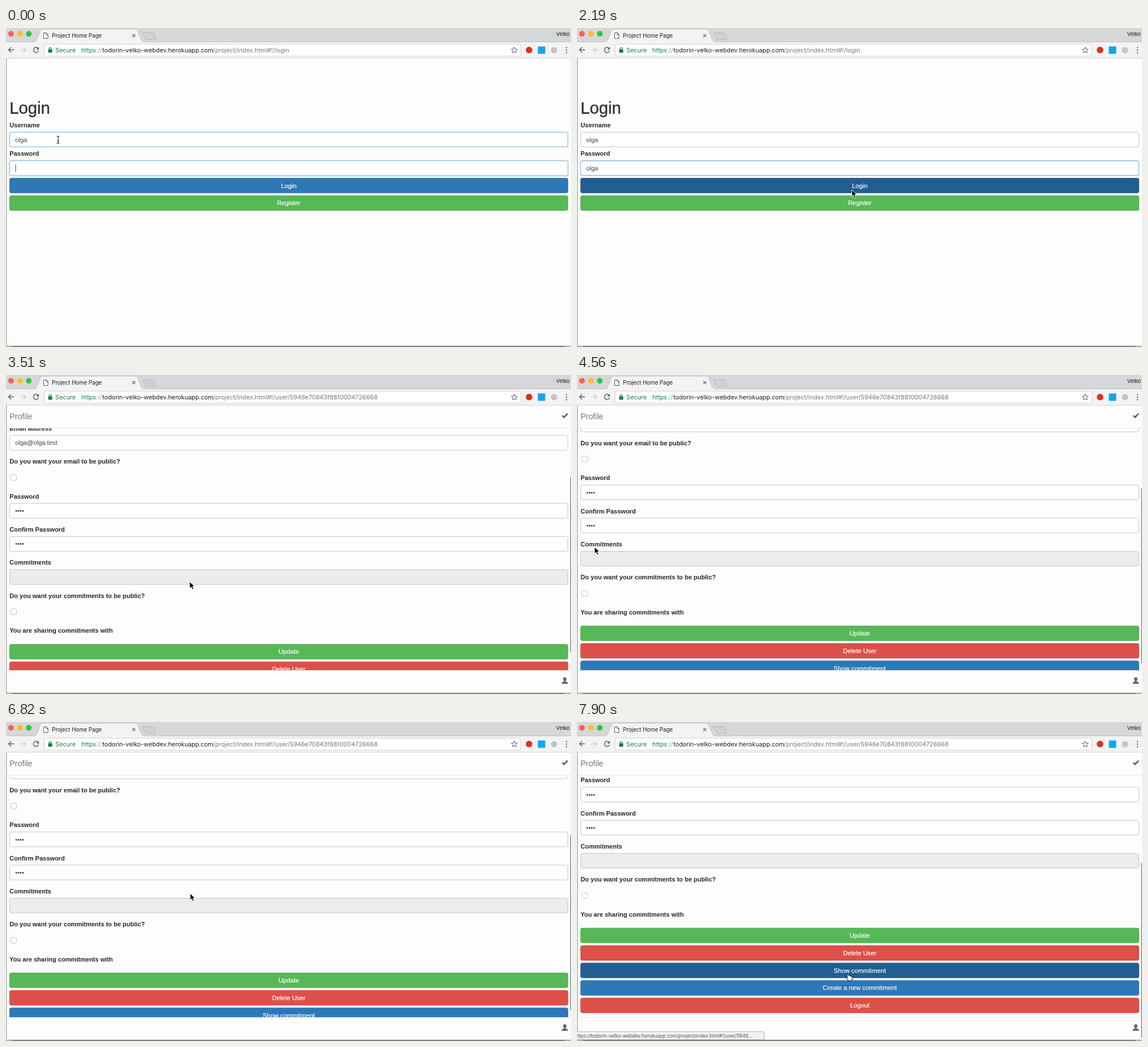
An HTML page that plays this animation: 997x562 px, repeating every 8 s.

```html
<!DOCTYPE html>
<html lang="en">
<head>
<meta charset="utf-8">
<title>Login and profile</title>
<style>
html, body { margin: 0; width: 100%; height: 100%; overflow: hidden; background: #fdfdfd; }
svg { display: block; width: 997px; height: 562px; }
text { white-space: pre; }
.ui { font-family: Inter, sans-serif; font-size: 10.8px; }
.page { font-family: "Liberation Sans", Arial, sans-serif; font-size: 11.1px; fill: #444; }
.label { font-weight: bold; font-size: 11.03px; fill: #262626; }
.button { font-size: 11.2px; fill: #fff; stroke: #fff; stroke-width: .2; text-anchor: middle; }
</style>
</head>
<body>
<svg viewBox="0 0 997 562">
  <defs><clipPath id="view"><rect y="53" width="997" height="507"/></clipPath></defs>
  <g id="page" class="page" clip-path="url(#view)"></g>

  <g class="ui">
    <rect width="997" height="24.5" fill="#d6d7d9"/>
    <rect y="24" width="997" height="29" fill="#f3f3f4"/>
    <path d="M0 24.5H50Q53 24 54.500 20L60.500 5Q62 2 65 2H228Q231 2 232.500 5L238.500 20Q240 24 243 24.500H997" fill="#f3f3f4" stroke="#b4b5b7" stroke-width=".8"/>
    <path d="M0 53.200H997" stroke="#d2d2d3"/>
    <path d="M242 8.500H258Q260 8.500 261 11L264.500 18.500Q265 20.500 263 20.500H249Q246.500 20.500 245.500 18L241 10Q240 8.500 242 8.500Z" fill="#d0d1d3" stroke="#aeafb1" stroke-width=".8"/>
    <circle cx="8.800" cy="10.300" r="5" fill="#fb5f57"/>
    <circle cx="24.500" cy="10.300" r="5" fill="#fdbc2e"/>
    <circle cx="40.200" cy="10.300" r="5" fill="#28c83f"/>
    <path d="M66.500 8.500H71L74 11.500V18.500H66.500ZM71 8.500V11.500H74" fill="#fff" stroke="#555"/>
    <text x="81" y="17" font-size="9.7" fill="#1c1c1c">Project Home Page</text>
    <path d="M222.800 10.700l5.400 5.400m0-5.400l-5.400 5.400" stroke="#555" stroke-width="1.100"/>
    <text x="995" y="13.700" font-size="9.4" text-anchor="end" fill="#1c1c1c">Velko</text>

    <g fill="none" stroke="#5a5a5a" stroke-width="1.400">
      <path d="M14 38.500H4.500M9 34L4.500 38.500L9 43"/>
      <path d="M25.500 38.500H35M30.500 34L35 38.500L30.500 43" stroke="#cfcfcf"/>
      <path d="M56.500 35.500A4.600 4.600 0 1 0 57.400 40"/>
    </g>
    <path d="M58 33.500V38H53.500Z" fill="#5a5a5a"/>
    <rect x="67.500" y="28.500" width="841" height="21" rx="2.500" fill="#fff" stroke="#d4d4d5"/>
    <rect x="74.500" y="37.500" width="7" height="6" rx=".6" fill="#0b8043"/>
    <path d="M76 38V36.500a2 2 0 0 1 4 0V38" fill="none" stroke="#0b8043" stroke-width="1.200"/>
    <text x="87" y="43" fill="#0b8043">Secure</text>
    <text x="133" y="43" fill="#0b8043">https<tspan fill="#6aa886">://</tspan></text>
    <text x="170" y="43" fill="#1c1c1c">todorin-velko-webdev.herokuapp.com</text>
    <text id="path" x="365" y="43" fill="#777"></text>
    <path d="M897 33.700l1.500 3.500 3.800.3-2.900 2.500.9 3.700-3.300-2-3.300 2 .9-3.700-2.900-2.500 3.800-.3z" fill="none" stroke="#5a5a5a"/>
    <circle cx="923" cy="38.800" r="5.800" fill="#e02f23"/>
    <rect x="938.500" y="32.500" width="13" height="13" fill="#12a5ee"/>
    <circle cx="967" cy="39" r="5.500" fill="#c4c4c4"/>
    <path d="M989 33.500v2m0 2.500v2m0 2.500v2" stroke="#555" stroke-width="2"/>
  </g>

  <path d="M.5 53V560" stroke="#8c8c8c"/>
  <path d="M0 560.800H997" stroke="#a5a5a5" stroke-width="2"/>
  <path d="M11 561H986" stroke="#707070" stroke-width="1.500"/>
  <g id="overlay" class="ui"></g>
</svg>
<script>
const $ = id => document.getElementById(id);
const LOOP = 8000, MAX_SCROLL = 316;
const GREEN = ['#57b857', '#46a546'], RED = ['#dc5049', '#cf4038'],
      BLUE = ['#2e78b8', '#286ca8'], DARK = ['#225e92', '#1d4d78'];

const TICKS = [0, 180, 360, 540, 830, 1130, 1280, 1440, 1590, 1740, 1900, 2050, 2190, 2340, 2520,
  2700, 2880, 3060, 3360, 3510, 3720, 4050, 4200, 4410, 4560, 4710, 4860, 5160, 5310, 5600, 5750,
  5910, 6060, 6220, 6380, 6670, 6820, 7120, 7270, 7480, 7690, 7900];

// Time followed by the values at that time.
const POINTER = [[1000, 92, 197], [1440, 200, 222], [1900, 460, 278], [2050, 485, 285], [2340, 485, 285],
  [3060, 324, 364], [3900, 324, 364], [4410, 60, 306], [4560, 31, 303], [5450, 31, 303],
  [6380, 116, 289], [6820, 325, 302], [7270, 325, 302], [7690, 460, 425], [7900, 477, 443]];
const SCROLL = [[3200, 0], [3360, 110], [3510, 204.6], [3720, 237], [6970, 237], [7120, 290],
  [7270, 320], [7480, 316]];

function track(keys, t) {
  const i = keys.findIndex(k => k[0] > t);
  if (i <= 0) return keys.at(i).slice(1);
  const a = keys[i - 1], b = keys[i], f = (t - a[0]) / (b[0] - a[0]);
  return a.slice(1).map((v, n) => v + (b[n + 1] - v) * f);
}

const box = (x, y, w, h, r, attrs) => `<rect x="${x}" y="${y}" width="${w}" height="${h}" rx="${r}" ${attrs}/>`;
const text = (x, y, s, attrs = '') => `<text x="${x}" y="${y}" ${attrs}>${s}</text>`;
const label = (y, s) => text(6.3, y + 4, s, 'class="label"');
const checkbox = y => box(8.5, y - 5, 10, 10, 2, 'fill="#fff" stroke="#c4c4c4"');

function input(y, name, value = '', { focus = 0, glow = 0, fill = '#fff' } = {}) {
  const top = y + 12.2, frame = attrs => box(6.5, top + .3, 985, 26, 3, attrs);
  return label(y, name) +
    (glow ? frame(`fill="none" stroke="#66afe9" stroke-width="4" opacity="${glow * .3}"`) : '') +
    frame(`fill="${fill}" stroke="#c6c6c6"`) +
    (focus ? frame(`fill="none" stroke="#6db2e4" opacity="${focus}"`) : '') +
    text(16.3, top + 17.3, value);
}

const button = (y, name, [fill, stroke]) =>
  box(6.4, y + .4, 985.2, 26, 3, `fill="${fill}" stroke="${stroke}" stroke-width=".8"`) +
  text(499, y + 17.3, name, 'class="button"');

function loginPage(t, hover) {
  const typed = [180, 360, 540, 830].filter(at => t >= at).length;
  const caretX = 17 + [0, 6, 8.6, 14.8, 21][typed];
  const early = t < 180;
  return text(6.3, 151, 'Login', 'font-size="29.2" fill="#333" stroke="#333" stroke-width=".4"') +
    input(171, 'Username', 'olga', { focus: +early }) +
    input(221.4, 'Password', 'olga'.slice(0, typed), { focus: early ? .4 : 1, glow: +early }) +
    (t < 1280 ? `<path d="M${caretX} 240.500V253" stroke="#333"/>` : '') +
    button(264.2, 'Login', hover ? DARK : BLUE) +
    button(295, 'Register', GREEN);
}

function profilePage(t, scroll, hover) {
  const bounce = Math.min(0, MAX_SCROLL - scroll);
  const focused = t >= 5160 && t < 5750;
  const buttons = [['Update', GREEN], ['Delete User', RED], ['Show commitment', hover ? DARK : BLUE],
    ['Create a new commitment', BLUE], ['Logout', RED]];
  return `<g transform="translate(0 ${-scroll})">` +
    input(123.5, 'Username', 'olga') +
    input(181.8, 'First Name') +
    input(240.2, 'Last Name') +
    input(298.5, 'Email address', 'olga@olga.test') +
    label(357, 'Do you want your email to be public?') + checkbox(385.2) +
    input(418.3, 'Password', '••••') +
    input(476.6, 'Confirm Password', '••••') +
    input(535, 'Commitments', '', { fill: '#ececec', focus: focused ? (t < 5310 ? .5 : 1) : 0, glow: focused ? .8 : 0 }) +
    label(593.2, 'Do you want your commitments to be public?') + checkbox(621.6) +
    label(655, 'You are sharing commitments with') +
    buttons.map(([name, color], i) => button(678.7 + i * 30.8, name, color)).join('') +
    `</g><g transform="translate(0 ${bounce})">` +
    box(0, 53, 997, 40.5, 0, 'fill="#fdfdfd"') + box(0, 520, 997, 50, 0, 'fill="#fdfdfd"') +
    '<path d="M0 93.500H997M0 520.500H997" stroke="#e6e6e6"/>' +
    text(6.3, 78, 'Profile', 'font-size="14.2" fill="#777"') +
    '<path d="M981.800 71.500l3 3 6.200-6.500" fill="none" stroke="#666" stroke-width="2.700"/>' +
    '<path d="M980.500 544v-1.500q0-1.500 4-2.600v-1q-1.500-1.500-1.500-3.500 0-3 3-3t3 3q0 2-1.500 3.500v1q4 1.100 4 2.600v1.500z" fill="#666"/></g>';
}

function cursor(kind, x, y) {
  const shape = {
    beam: '<path d="M-2.500-6.500Q0-6.500 0-5Q0-6.500 2.500-6.500M0-5V5.500M-2.500 6.500Q0 6.500 0 5Q0 6.500 2.500 6.500M-1.500 2.500h3" fill="none" stroke="#111"/>',
    arrow: '<path d="M0 0V11.800l2.800-2.500 2 4.500 2.200-1-2-4.300h3.800z" fill="#000" stroke="#fff" stroke-width=".9"/>',
    hand: '<path d="M0 1Q0-.5 1.200-.5T2.400 1V4.500Q4-.1 5 5Q6.300 3.700 7.300 5.500Q9 5 9 7Q9 10 7.500 13H1.800Q.5 10-2 8Q-2.500 6.500-1.200 6.500L0 7.500Z" fill="#fff" stroke="#000"/>'
  }[kind];
  return `<g transform="translate(${x} ${y})">${shape}</g>`;
}

const scrollbar = scroll => {
  const y = 53 + scroll * .617;
  return box(995.6, y, 2, Math.min(309, 557 - y), 1, 'fill="#858585"');
};

const status = () =>
  '<path d="M0 545.500H328Q330.500 545.500 330.500 548V559.500H0" fill="#f1f1f1" stroke="#b8b8b8"/>' +
  text(-4, 555.6, 'https://todorin-velko-webdev.herokuapp.com/project/index.html#!/user/5946...', 'font-size="8.4" fill="#555"');

function draw(t) {
  const [x, y] = track(POINTER, t), [scroll] = track(SCROLL, t);
  const login = t < 2340;
  const onLogin = login && y > 264, onShow = t >= 7690;
  const kind = login && y < 215 ? 'beam' : t >= 7690 ? 'hand' : 'arrow';
  $('page').innerHTML = box(0, 53, 997, 507, 0, 'fill="#fdfdfd"') +
    (login ? loginPage(t, onLogin) : profilePage(t, scroll, onShow));
  $('path').textContent = '/project/index.html#!/' + (login ? 'login' : 'user/5946e70843f8810004726668');
  $('overlay').innerHTML = (scroll ? scrollbar(scroll) : '') + (t >= 7900 ? status() : '') + cursor(kind, x, y);
}

let shown = -1;
function loop(now) {
  const tick = TICKS.findLast(at => at <= now % LOOP);
  if (tick !== shown) draw(shown = tick);
  requestAnimationFrame(loop);
}
loop(performance.now());
</script>
</body>
</html>
```
